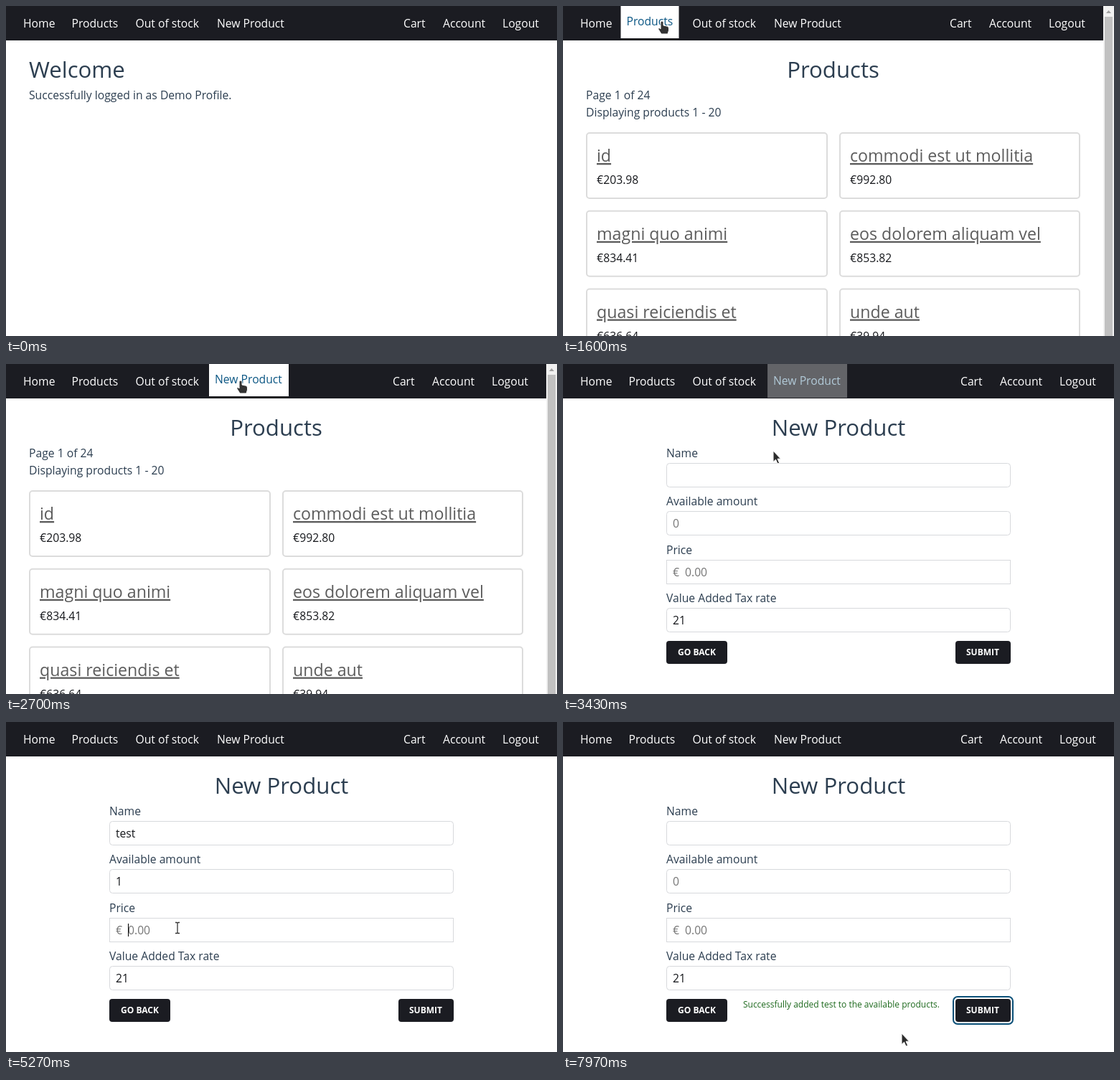
An HTML page for the animation above (8000 ms loop, 768 by 460 pixels).

```html
<!DOCTYPE html>
<html lang="en">
<head>
<meta charset="utf-8">
<title>Shop</title>
<style>
  html, body { margin: 0; height: 100%; overflow: hidden; background: #fff; }
  svg { display: block; width: 768px; height: 460px; }
  text { font: 15.7px "Open Sans", "Noto Sans", sans-serif; fill: #2c3e50; white-space: pre; }
  .title { font-size: 31.2px; }
  .name { font-size: 23.2px; fill: #5c5c5c; text-decoration: underline; text-decoration-thickness: 1.5px; }
  .price, .value { fill: #16181c; }
  .empty { fill: #757575; }
  .label { font-size: 12px; font-weight: 700; fill: #fff; }
  .done { font-size: 12px; fill: #1d691d; }
  .mid { text-anchor: middle; }
  .card { fill: #fff; stroke: #dcdcdc; stroke-width: 2; }
  .field { fill: #fff; stroke: #d7d9dc; }
  .button { fill: #1b1c22; }
</style>
</head>
<body>
<svg id="stage" viewBox="0 0 768 460"></svg>
<script>
const LOOP = 8000, FADE = 220;
const OPEN_LIST = 1130, OPEN_FORM = 3080, PRESS = 7130, SAVED = 7360;

// Pointer stops: time, x, y
const stops = [
  [180, 116, -22], [620, 138, 21], [1720, 138, 21], [2340, 327, 23], [3222, 327, 23],
  [3430, 293, 121], [3860, 278, 150], [4490, 278, 150], [4640, 260, 227], [4960, 260, 227],
  [5200, 239, 287], [5850, 239, 287], [6300, 486, 441], [6480, 557, 407],
  [7440, 557, 407], [7970, 472, 434]
];

const links = [
  ['Home', 24, 43], ['Products', 91.5, 65], ['Out of stock', 180.5, 90], ['New Product', 294, 95],
  ['Cart', 554, 31], ['Account', 609, 59], ['Logout', 692, 52]
].map(([label, x, w]) => ({ label, x, w, box: [x - 8, 0, w + 16, 48] }));

const products = [
  ['id', '203.98'], ['commodi est ut mollitia', '992.80'],
  ['magni quo animi', '834.41'], ['eos dolorem aliquam vel', '853.82'],
  ['quasi reiciendis et', '636.64'], ['unde aut', '39.94']
];

// Keystrokes: time and resulting value
const fields = [
  { label: 'Name', hint: '', x: 153, focus: 3950, keys: [[4200, 't'], [4320, 'te'], [4470, 'tes'], [4540, 'test']] },
  { label: 'Available amount', hint: '0', x: 153, focus: 4800, keys: [[4920, '1']] },
  { label: 'Price', hint: '0.00', x: 170, focus: 5260, keys: [[5590, '2'], [5840, '23']] },
  { label: 'Value Added Tax rate', hint: '21', x: 153, focus: PRESS, keys: [] }
];
fields.forEach((f, i) => { f.y = 138 + Math.round(67.4 * i); f.box = [144, f.y, 480, 34]; });
const submitBox = [547, 386, 77, 32];

const text = (x, y, str, cls = '', id = '') => `<text x="${x}" y="${y}" class="${cls}" id="${id}">${str}</text>`;
const rect = ([x, y, w, h], cls, r = 0, more = '') =>
  `<rect x="${x}" y="${y}" width="${w}" height="${h}" rx="${r}" class="${cls}" ${more}/>`;

const card = ([name, price], i) => {
  const x = i % 2 ? 386 : 33, y = 177 + 108.75 * (i >> 1);
  return rect([x, y, 335 - i % 2, 91], 'card', 4) +
    text(x + 14, y + 40, name, 'name') + text(x + 14, y + 71, '€' + price, 'price');
};
const field = (f, i) =>
  text(144, f.y - 8, f.label) +
  rect([144.5, f.y + .5, 479, 33], 'field', i === 2 ? 0 : 4) +
  (i === 2 ? text(153, f.y + 23, '€', 'empty') : '') +
  text(f.x, f.y + 23, '', '', 'value' + i);
const link = (l, i) =>
  `<g id="link${i}">${rect(l.box, '', 0, 'fill="#fff"')}${text(l.x, 30, l.label)}</g>`;

stage.innerHTML = `
  <g id="home">
    ${text(32, 100, 'Welcome', 'title')}
    ${text(32, 130, 'Successfully logged in as Demo Profile.')}
  </g>
  <g id="list">
    ${text(376.5, 100, 'Products', 'title mid')}
    ${text(32, 130, 'Page 1 of 24')}
    ${text(32, 154, 'Displaying products 1 - 20')}
    ${products.map(card).join('')}
  </g>
  <g id="form">
    ${text(384, 100, 'New Product', 'title mid')}
    ${fields.map(field).join('')}
    ${rect([144, 386, 85, 32], 'button', 4)}
    ${text(186.5, 406, 'GO BACK', 'label mid')}
    <g id="submit">${rect(submitBox, 'button', 4)}${text(585, 406, 'SUBMIT', 'label mid')}</g>
    ${rect([544, 383, 83, 38], '', 6, 'id="ring" fill="none" stroke="#0b5078" stroke-width="2"')}
    ${text(388, 398, 'Successfully added test to the available products.', 'done mid', 'done')}
    <rect id="caret" width="1" height="18"/>
  </g>
  ${rect([0, 0, 768, 48], 'button')}
  ${links.map(link).join('')}
  <g id="scrollbar">
    <rect x="753" width="15" height="460" fill="#f1f1f1"/>
    <rect x="755" y="15" width="11" height="445" fill="#c1c1c1"/>
    <path d="M757 10l3.5-4 3.5 4z" fill="#a0a0a0"/>
  </g>
  <g id="pointer">
    <path id="arrow" fill="#2b2b2b" stroke="#fff" d="M0 0V15.5L3.5 12.2 6 18 8.6 16.9 6 11.2H10.5Z"/>
    <path id="hand" fill="#333" stroke="#fff" d="M-2 1.8Q-2 0 0 0T2 1.8V6L7.5 7.2Q9.5 7.8 9.5 10V13L8 18H-1L-5 11.5Q-5.5 9.5-4 9.3L-2 11Z"/>
    <g id="beam" fill="none">
      <path stroke="#fff" stroke-width="3" d="M0-7V7"/>
      <path stroke="#333" stroke-width="1.3" d="M-3-7.5H-1L0-6.7 1-7.5H3M-3 7.5H-1L0 6.7 1 7.5H3M0-7V7"/>
    </g>
  </g>`;

const $ = id => document.getElementById(id);
const show = (id, on) => $(id).setAttribute('display', on ? 'inline' : 'none');

function pointerAt(t) {
  const next = stops.findIndex(s => s[0] > t);
  if (next === 0) return stops[0].slice(1);
  if (next < 0) return stops[stops.length - 1].slice(1);
  const [t0, x0, y0] = stops[next - 1], [t1, x1, y1] = stops[next];
  const p = (t - t0) / (t1 - t0), e = p * p * (3 - 2 * p);
  return [x0 + (x1 - x0) * e, y0 + (y1 - y0) * e];
}
const inside = ([px, py], [x, y, w, h]) => px >= x && px < x + w && py >= y && py < y + h;

// Linear hover transition: share of the last FADE ms spent over the box
function hover(box, t) {
  const n = 22;
  let hits = 0;
  for (let i = 0; i < n; i++) hits += inside(pointerAt(t - i * FADE / n), box);
  return hits / n;
}

function drawFields(t) {
  let caret = null;
  fields.forEach((f, i) => {
    const typed = t < SAVED ? f.keys.filter(k => k[0] <= t).pop() : null;
    const node = $('value' + i);
    node.textContent = typed ? typed[1] : f.hint;
    node.setAttribute('class', typed || i === 3 ? 'value' : 'empty');
    const end = i < 3 ? fields[i + 1].focus : PRESS;
    if (t >= f.focus && t < end) {
      const since = t - (typed ? typed[0] : f.focus);
      if (since % 1000 < 500) caret = [f.x + (typed ? node.getComputedTextLength() : 0), f.y + 8];
    }
  });
  show('caret', caret);
  if (caret) {
    $('caret').setAttribute('x', Math.round(caret[0]));
    $('caret').setAttribute('y', caret[1]);
  }
}

function draw(t) {
  const list = t >= OPEN_LIST && t < OPEN_FORM, form = t >= OPEN_FORM;
  show('home', t < OPEN_LIST);
  show('list', list);
  show('scrollbar', list);
  show('form', form);
  if (form) drawFields(t);
  show('ring', t >= PRESS);
  show('done', t >= SAVED);
  $('submit').setAttribute('opacity', 1 - .4 * hover(submitBox, t));

  links.forEach((l, i) => {
    const k = hover(l.box, t), g = $('link' + i);
    const shift = list && i > 3 ? -15 : 0;
    g.setAttribute('transform', `translate(${shift - 3 * k} ${-3 * k})`);
    g.firstChild.setAttribute('opacity', k);
    g.lastChild.style.fill = `rgb(${[12, 87, 132].map(c => 255 + (c - 255) * k)})`;
  });

  const p = pointerAt(t);
  const hand = links.some(l => inside(p, l.box)) || form && inside(p, submitBox);
  const beam = form && fields.some(f => inside(p, f.box));
  show('hand', hand);
  show('beam', beam);
  show('arrow', !hand && !beam);
  $('pointer').setAttribute('transform', `translate(${p.map(Math.round)})`);
}

const start = performance.now();
function tick() {
  draw((performance.now() - start) % LOOP);
  requestAnimationFrame(tick);
}
tick();
</script>
</body>
</html>
```
